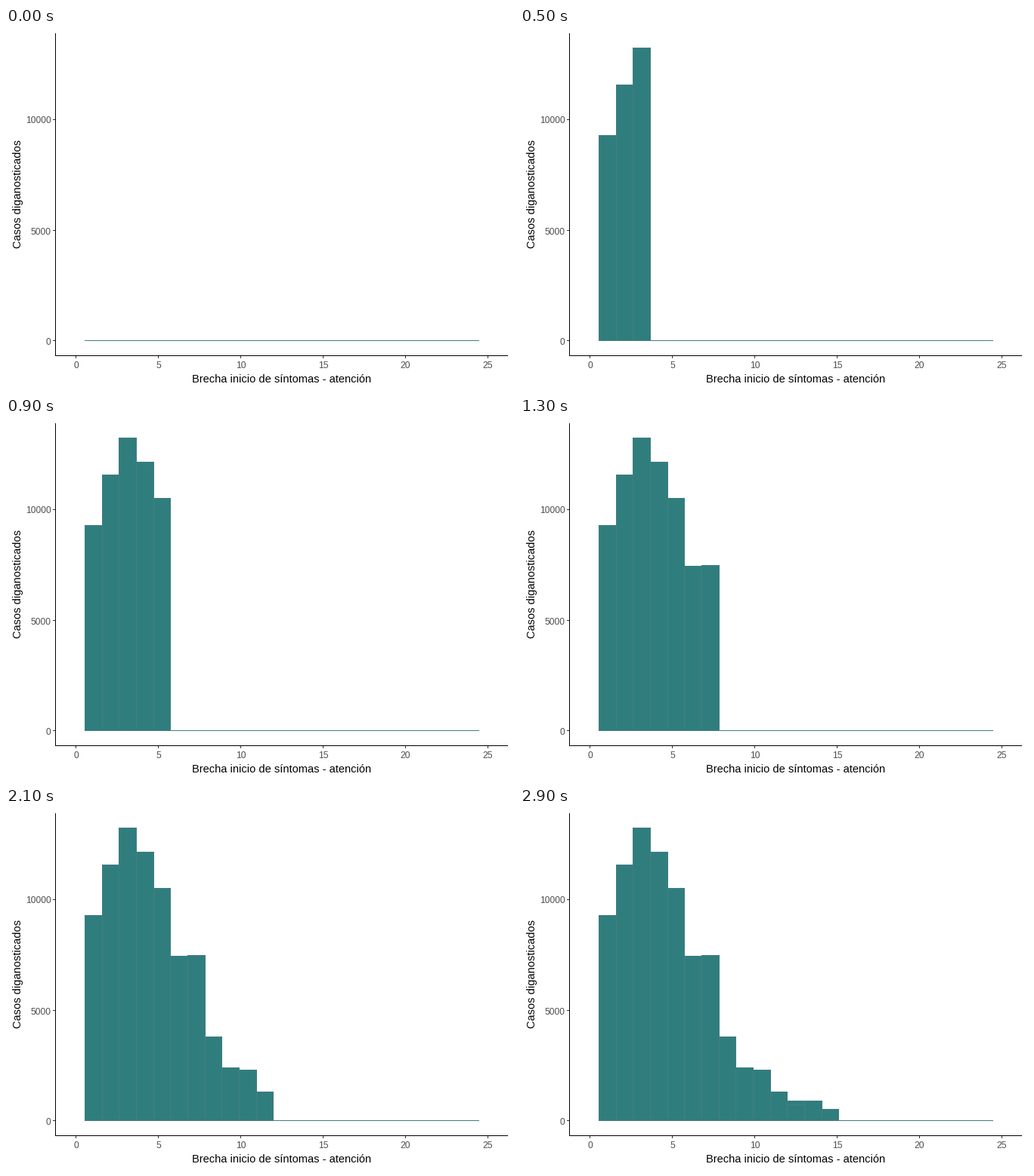
A matplotlib script for the animation above (10 s loop, 672 by 480 pixels).

```python
import matplotlib.pyplot as plt
from matplotlib.animation import FuncAnimation
from matplotlib.patches import Rectangle

W, H, DPI = 672, 480, 96
FILL, EDGE = "#2f7e7d", "#467c82"
BASE = 414                      # pixel row of zero cases
LEFT, STEP, BINS = 104.4, 22.67, 23
TOPS = [142, 75, 26, 58, 106, 196, 195, 303, 344, 347, 376, 388, 388, 399]
SEAM_STEP = 12                  # a second day joins the twelfth bin here

plt.rcParams["font.family"] = "Liberation Sans"
fig = plt.figure(figsize=(W / DPI, H / DPI), dpi=DPI, facecolor="white")
ax = fig.add_axes([0, 0, 1, 1])
ax.set_xlim(0, W)
ax.set_ylim(H, 0)
ax.axis("off")


def box(x0, y0, x1, y1, color, z=1):
    """Fill whole pixels from (x0, y0) up to but excluding (x1, y1)."""
    patch = Rectangle((x0, y0), x1 - x0, y1 - y0, facecolor=color,
                      linewidth=0, antialiased=False, zorder=z)
    return ax.add_patch(patch)


def label(x, y, text, size, color, ha="center", rotation=0):
    ax.text(x, y, text, fontsize=size, color=color, ha=ha, va="baseline",
            rotation=rotation, rotation_mode="anchor")


def edge(k):
    return int(LEFT + STEP * k)


def bar(k, top):
    x0, x1 = edge(k), edge(k + 1) + 1
    return [box(x0, top, x1, BASE + 1, EDGE, 3 + k),
            box(x0 + 1, top + 1, x1 - 1, BASE, FILL, 3 + k)]


# axes and ticks
for i in range(6):
    x = 92 + 109 * i
    box(x, 435, x + 1, 438, "#333333")
    label(x + 0.5, 451, str(5 * i), 9, "#4d4d4d")
for value, y in ((0, 414), (5000, 268), (10000, 121)):
    box(62, y, 65, y + 1, "#333333")
    label(59.5, y + 5.5, str(value), 9, "#4d4d4d", ha="right")
box(65, 7, 66, 435, "black", 2)
box(65, 434, 664, 435, "black", 2)
label(365, 470, "Brecha inicio de síntomas - atención", 11, "black")
label(20, 220.5, "Casos diganosticados", 11, "black", rotation=90)

# histogram
box(edge(0), BASE, edge(BINS) + 1, BASE + 1, EDGE, 2)
bars = [bar(k, top) for k, top in enumerate(TOPS)]
seam = box(edge(11) + 1, 393, edge(12), 394, EDGE, 30)


def draw(frame):
    step = (frame - 1) // 2     # one step every 200 ms, from 100 ms on
    for k, parts in enumerate(bars):
        start = k if k < SEAM_STEP else k + 1
        for part in parts:
            part.set_visible(step >= start)
    seam.set_visible(step >= SEAM_STEP)
    return [seam, *(p for parts in bars for p in parts)]


anim = FuncAnimation(fig, draw, frames=100, interval=100,
                     repeat=True, repeat_delay=0, blit=False)
plt.show()
```
